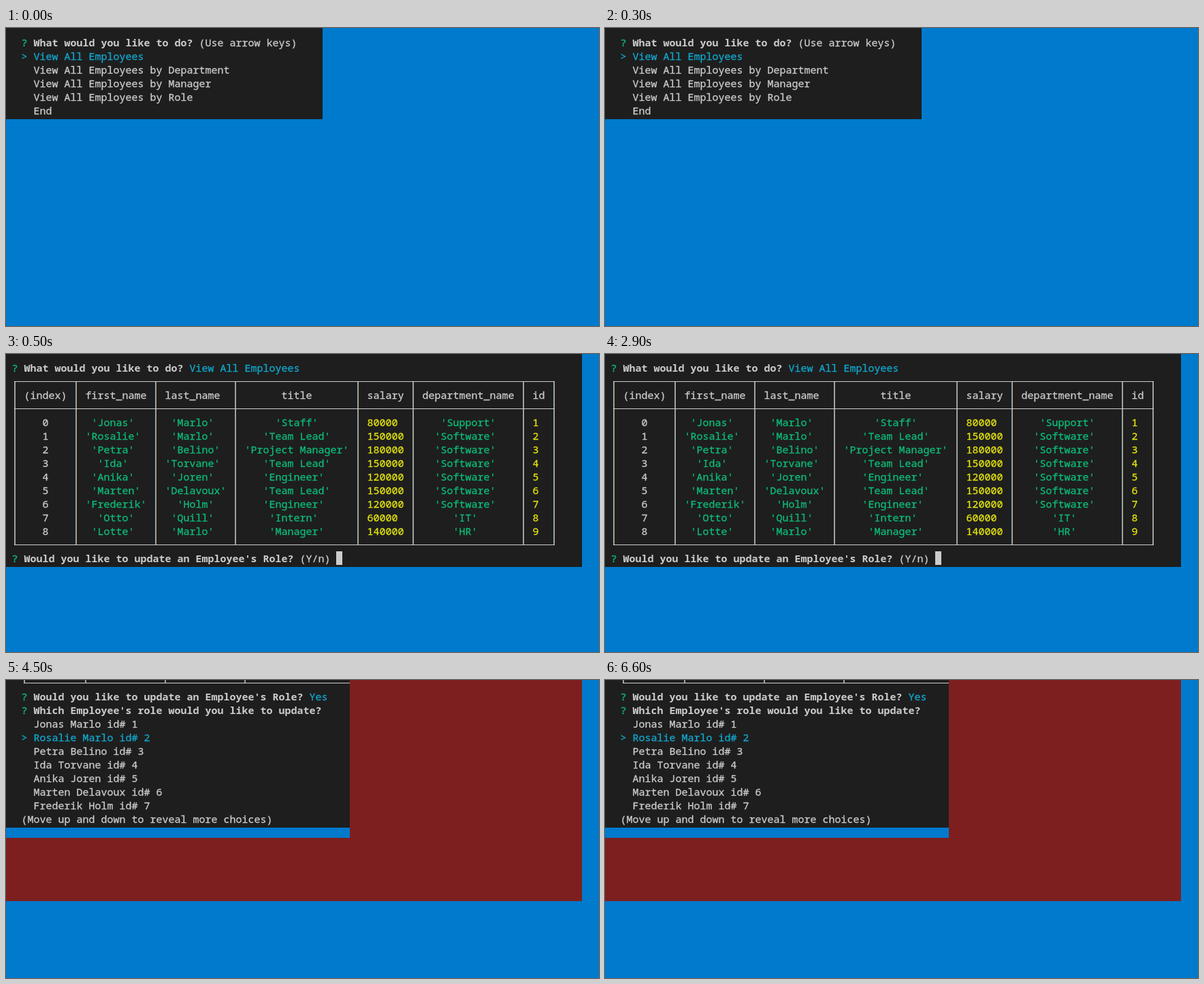
Recreate the animation shown at these times as an HTML page with a canvas. Size 871 by 438 pixels, loop 8000 ms.

```html
<!DOCTYPE html>
<html lang="en">
<head>
<meta charset="utf-8">
<title>Employee tracker</title>
<style>
  html, body { margin: 0; width: 100%; height: 100%; overflow: hidden; background: #007acc; }
  canvas { display: block; }
</style>
</head>
<body>
<canvas id="stage" width="871" height="438"></canvas>
<script>
const ctx = document.getElementById('stage').getContext('2d', { alpha: false });
const LOOP = 8000, CELL = 9, ROW = 20;
const BLUE = '#007acc', DARK = '#1e1e1e', RED = '#7e1f1f';
const TEXT = '#cccccc', GREEN = '#0dbc79', CYAN = '#11a8cd', YELLOW = '#e5e510';
const EDGE_LEFT = '#6ea6cc', EDGE_RIGHT = '#cca06e';

const people = [
  ['Jonas', 'Marlo', 'Staff', 80000, 'Support'],
  ['Rosalie', 'Marlo', 'Team Lead', 150000, 'Software'],
  ['Petra', 'Belino', 'Project Manager', 180000, 'Software'],
  ['Ida', 'Torvane', 'Team Lead', 150000, 'Software'],
  ['Anika', 'Joren', 'Engineer', 120000, 'Software'],
  ['Marten', 'Delavoux', 'Team Lead', 150000, 'Software'],
  ['Frederik', 'Holm', 'Engineer', 120000, 'Software'],
  ['Otto', 'Quill', 'Intern', 60000, 'IT'],
  ['Lotte', 'Marlo', 'Manager', 140000, 'HR']
];
const headers = ['(index)', 'first_name', 'last_name', 'title', 'salary', 'department_name', 'id'];
const borders = [0, 10, 23, 36, 56, 65, 83, 88];

function rect(x, y, w, h, color) {
  ctx.fillStyle = color;
  ctx.fillRect(x, y, w, h);
}

// y is the middle of the text row
function write(text, x, y, color = TEXT, bold = false) {
  ctx.font = `${bold ? 'bold ' : ''}15px "Noto Sans Mono", monospace`;
  ctx.fillStyle = ctx.strokeStyle = color;
  ctx.lineWidth = 0.3;
  ctx.fillText(text, x + 0.5, y + 6);
  if (!bold) ctx.strokeText(text, x + 0.5, y + 6);
}

function prompt(question, answer, x, y, color) {
  write('?', x, y, GREEN);
  write(question, x + 2 * CELL, y, TEXT, true);
  write(answer, x + (question.length + 3) * CELL, y, color);
}

function list(items, selected, x, y) {
  items.forEach((item, i) => {
    const color = i === selected ? CYAN : TEXT;
    if (i === selected) write('>', x, y + i * ROW, color);
    write(item, x + 2 * CELL, y + i * ROW, color);
  });
}

// an upright line with subpixel colour fringes
function upright(col, x, y, h) {
  const left = x + col * CELL + 4;
  rect(left, y, 1, h, EDGE_LEFT);
  rect(left + 1, y, 1, h, EDGE_RIGHT);
}

function tableRow(values, x, y, colorOf) {
  values.forEach((value, i) => {
    const room = borders[i + 1] - borders[i] - 1;
    const text = String(value);
    const pad = Math.floor((room - text.length) / 2);
    // numbers sit flush left, apart from the index
    const indent = typeof value === 'number' && i > 0 ? 1 : pad;
    write(text, x + (borders[i] + 1 + indent) * CELL, y, colorOf(value, i));
  });
}

function menuScreen() {
  rect(0, 0, 465, 134, DARK);
  prompt('What would you like to do?', '(Use arrow keys)', 22, 21, TEXT);
  list(['View All Employees', 'View All Employees by Department',
    'View All Employees by Manager', 'View All Employees by Role', 'End'], 0, 22, 41);
}

function tableScreen() {
  const x = 8;
  rect(0, 0, 846, 313, DARK);
  prompt('What would you like to do?', 'View All Employees', x, 20, CYAN);
  for (const col of borders) upright(col, x, 40, 241);
  for (const y of [40, 80, 280]) rect(x + 4, y, 88 * CELL + 2, 1, TEXT);
  tableRow(headers, x, 60, () => TEXT);
  people.forEach(([first, last, title, salary, department], i) => {
    const quoted = [first, last, title].map(s => `'${s}'`);
    tableRow([i, ...quoted, salary, `'${department}'`, i + 1], x, 100 + i * ROW,
      (value, col) => col === 0 ? TEXT : typeof value === 'number' ? YELLOW : GREEN);
  });
  prompt("Would you like to update an Employee's Role?", '(Y/n)', x, 300, TEXT);
  rect(485, 290, 9, 20, TEXT);
}

function roleScreen() {
  const x = 22;
  rect(0, 0, 846, 325, RED);
  rect(0, 0, 505, 217, DARK);
  rect(0, 217, 505, 15, BLUE);
  for (const col of borders.slice(0, 4)) upright(col, x, 0, 5);
  rect(x + 4, 4, 479, 1, TEXT);
  prompt("Would you like to update an Employee's Role?", 'Yes', x, 24, CYAN);
  prompt("Which Employee's role would you like to update?", '', x, 44, TEXT);
  list(people.slice(0, 7).map(([first, last], i) => `${first} ${last} id# ${i + 1}`), 1, x, 64);
  write('(Move up and down to reveal more choices)', x, 204);
}

function draw(now) {
  const t = now % LOOP;
  rect(0, 0, 871, 438, BLUE);
  if (t < 500) menuScreen();
  else if (t < 4500) tableScreen();
  else roleScreen();
}

let start;
function tick(now) {
  start ??= now;
  draw(now - start);
  requestAnimationFrame(tick);
}
draw(0);
requestAnimationFrame(tick);
</script>
</body>
</html>
```
